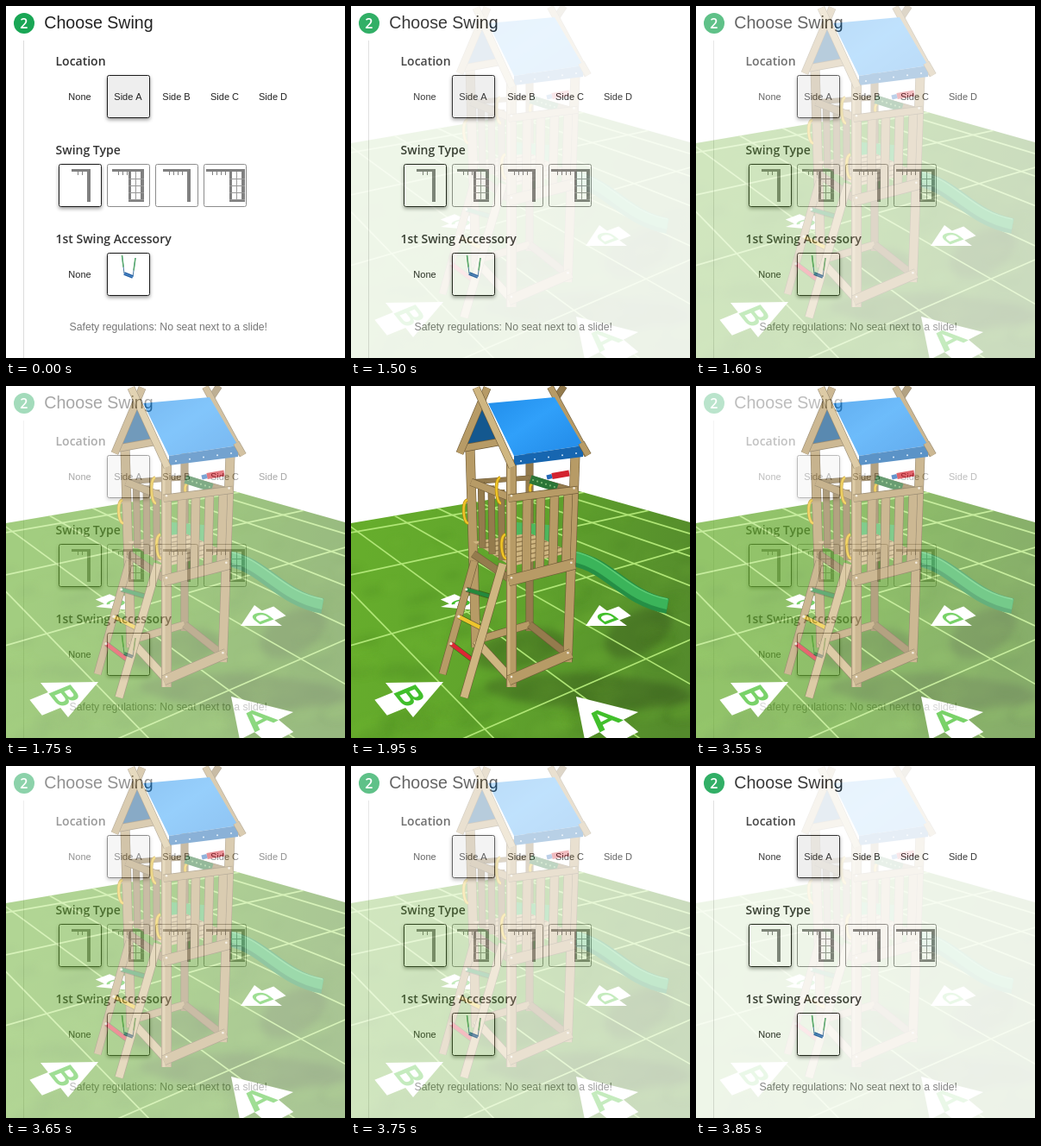
An HTML page with a canvas for the animation above (3.9 s loop, 393 by 408 pixels).

```html
<!DOCTYPE html>
<html lang="en">
<head>
<meta charset="utf-8">
<title>Choose Swing</title>
<style>
html, body { margin: 0; width: 100%; height: 100%; overflow: hidden; background: #fff; }
canvas { display: block; width: 393px; height: 408px; }
</style>
</head>
<body>
<canvas id="stage" width="393" height="408"></canvas>
<script>
const W = 393, H = 408, LOOP = 3900;
const SANS = '"Liberation Sans", Arial, sans-serif';
const OPEN = '"Open Sans", sans-serif';
let g;

function layer(draw) {
  const c = document.createElement('canvas');
  c.width = W;
  c.height = H;
  g = c.getContext('2d');
  draw();
  return c;
}

function text(s, x, y, font, color, align = 'left') {
  g.font = font;
  g.fillStyle = color;
  g.textAlign = align;
  g.fillText(s, x, y);
}

// Points are [x, y] pairs.
function path(points) {
  g.beginPath();
  for (const [x, y] of points) g.lineTo(x, y);
}

function poly(fill, ...points) {
  path(points);
  g.closePath();
  g.fillStyle = fill;
  g.fill();
}

function line(color, w, ...points) {
  path(points);
  g.strokeStyle = color;
  g.lineWidth = w;
  g.stroke();
}

function oval(color, x, y, rx, ry = rx, turn = 0) {
  g.beginPath();
  g.ellipse(x, y, rx, ry, turn, 0, 7);
  g.fillStyle = color;
  g.fill();
}

function blend(x1, y1, x2, y2, ...colors) {
  const f = g.createLinearGradient(x1, y1, x2, y2);
  colors.forEach((c, i) => f.addColorStop(i / (colors.length - 1), c));
  return f;
}

const mix = (a, b, t) => a.map((n, i) => n + (b[i] - n) * t);

// ---------- form ----------

function tile(x, y, fill, selected) {
  g.save();
  if (selected) {
    g.shadowColor = 'rgba(0,0,0,.4)';
    g.shadowBlur = 4;
    g.shadowOffsetY = 2;
  }
  g.beginPath();
  g.roundRect(x, y, 50, 50, 2.5);
  g.fillStyle = fill;
  g.fill();
  g.restore();
  g.beginPath();
  g.roundRect(x + .5, y + .5, 49, 49, 2);
  g.strokeStyle = selected ? '#1c1c1c' : '#8c8c8c';
  g.lineWidth = 1;
  g.stroke();
}

function swingIcon(x1, x2, tower) {
  const left = x2 - (tower ? 18 : 5);
  g.fillStyle = '#808080';
  g.fillRect(x1, 189, x2 - x1, 3);
  for (let x = x1 + 7; x < left - 1; x += 5) g.fillRect(x, 192, 1, 4);
  g.fillRect(x2 - 4, 189, 4, 38);
  if (!tower) return;
  g.fillRect(left, 189, 3, 38);
  g.fillRect(left, 224, 18, 3);
  g.fillStyle = '#999';
  g.fillRect(left + 8, 192, 1, 33);
  for (let y = 200; y < 225; y += 8) g.fillRect(left, y, 18, 1);
}

function swingPicture() {
  const seat = [[137, 310], [147, 314]];
  [[134.5, 289], [150, 292]].forEach((top, i) => {
    line('#4879a5', 1, top, seat[i]);
    line('#5fae72', 1.6, top, mix(top, seat[i], .65));
  });
  line('#2460a6', 4, ...seat);
  line('#5c97cf', 1, ...seat);
}

function drawForm() {
  g.fillStyle = '#fff';
  g.fillRect(0, 0, W, H);
  g.fillStyle = '#ddd';
  g.fillRect(20, 40, 1, H);
  oval('#19a655', 21, 20, 12);
  text('2', 20.7, 26, `600 16px ${OPEN}`, '#fff', 'center');
  text('Choose Swing', 44.3, 26, `19.6px ${SANS}`, '#222');

  const column = i => 61 + 56 * i;
  const option = (s, i, y) => text(s, column(i) + 24.5, y, `11px ${SANS}`, '#222', 'center');
  ['Location', 'Swing Type', '1st Swing Accessory'].forEach((s, i) =>
    text(s, 57.5, 69 + 103 * i, `600 14px ${OPEN}`, '#333'));

  tile(column(1), 80, '#eee', true);
  ['None', 'Side A', 'Side B', 'Side C', 'Side D'].forEach((s, i) => option(s, i, 109));

  for (let i = 0; i < 4; i++) tile(column(i), 183, '#fff', i === 0);
  swingIcon(76, 98, false);
  swingIcon(123, 160, true);
  swingIcon(182, 214, false);
  swingIcon(232, 277, true);

  option('None', 0, 315);
  tile(column(1), 286, '#fff', true);
  swingPicture();
  text('Safety regulations: No seat next to a slide!', 73.5, 376, `12.25px ${SANS}`, '#777');
}

// ---------- ground ----------

// An arrow on the grass: centre of its wings, vector to the tip, vector to the right wing.
function arrow(label, [x, y], [tx, ty], [rx, ry]) {
  const p = (t, r) => [x + t * tx + r * rx, y + t * ty + r * ry];
  poly('#fff', p(1, 0), p(0, 1), p(0, .45), p(-.42, .45), p(-.42, -.45), p(0, -.45), p(0, -1));
  g.save();
  g.transform(rx * .066, ry * .066, -tx * .036, -ty * .036, ...p(.25, 0));
  text(label, 0, 7.2, `bold 20px ${SANS}`, '#41bf2b', 'center');
  g.restore();
}

function drawGround() {
  g.save();
  path([[0, 159], [247, 117], [W, 158], [W, H], [0, H]]);
  g.clip();
  g.fillStyle = blend(0, 260, W, 340, '#66ad2c', '#5fa22c', '#548a2c');
  g.fillRect(0, 0, W, H);

  let seed = 7;
  const rnd = () => (seed = seed * 16807 % 2147483647) / 2147483647;
  g.filter = 'blur(4px)';
  for (let i = 0; i < 130; i++) {
    const y = 125 + rnd() * 285, r = 2 + (y - 110) / 35;
    oval(rnd() < .5 ? 'rgba(45,95,20,.12)' : 'rgba(135,200,60,.12)', rnd() * W, y, r * 2.2, r, -.2);
  }
  const shade = 'rgba(45,65,25,.3)';
  oval(shade, 333, 286, 42, 24, -.5);
  oval(shade, 275, 354, 120, 20, .05);
  oval(shade, 195, 305, 55, 22, -.2);
  g.filter = 'none';

  // two families of lines, each meeting in its own vanishing point on the horizon
  const horizon = -25;
  for (let k = 0; k < 5; k++) line('#b0e676', 1.7, [0, horizon + 1 / (.00513 - k * .00103)], [1126, horizon]);
  for (let k = 0; k < 8; k++) line('#b0e676', 1.7, [-257, horizon], [W, horizon + 1 / (.0051 - k * .0006)]);
  g.restore();

  arrow('A', [302, 394], [-41, -34], [31, -16]);
  arrow('B', [56, 364], [51, -21], [16, 20]);
  arrow('C', [122, 249], [24, 11], [-18, 7]);
  arrow('D', [304, 266], [-32, 12], [-16, -12]);
}

function drawSlide() {
  const chute = (color, w, dy) => {
    g.beginPath();
    g.moveTo(258, 200 + dy);
    g.bezierCurveTo(300, 208 + dy, 318, 246 + dy, 367, 255 + dy);
    g.strokeStyle = color;
    g.lineWidth = w;
    g.stroke();
  };
  chute('#258f45', 18, 0);
  chute('#3bb45a', 12, -2);
  chute('#5dcc74', 1.5, -8);
}

// ---------- tower ----------

const LIGHT = '#cfb681', MID = '#b79b66', DARK = '#947b4d', SHADE = '#6f5b38';

// Corner posts as seen on the stage: foot and top of each.
const POSTS = {
  front: [[186, 349], [186, 85]],
  right: [[251, 320], [260, 80]],
  left: [[145, 303], [138, 72]],
  back: [[207, 284], [207, 70]]
};

// Place inside the tower: u runs front to right, v front to left, h foot to top.
function at(u, v, h) {
  const p = name => mix(...POSTS[name], h);
  return mix(mix(p('front'), p('right'), u), mix(p('left'), p('back'), u), v);
}

function beam(a, b, w, color = MID) {
  line(SHADE, w, a, b);
  line(color, w - 1.2, a, b);
}

const post = (u, v, w, color) => beam(at(u, v, 0), at(u, v, 1), w, color);

function handle(x, y, h) {
  for (const [color, w] of [['#b58a13', 3.6], ['#f0c629', 2.2]]) {
    g.beginPath();
    g.moveTo(x + 3, y);
    g.bezierCurveTo(x - 4, y + 2, x - 2, y + h, x + 4, y + h);
    g.strokeStyle = color;
    g.lineWidth = w;
    g.stroke();
  }
}

function drawTower() {
  const base = .035, deck = .47, floor = .53, rail = .83;

  // far sides
  post(1, 1, 9, DARK);
  beam(at(0, 1, base), at(1, 1, base), 9);
  beam(at(1, 0, base), at(1, 1, base), 9, DARK);
  beam(at(0, 1, rail), at(1, 1, rail), 6, DARK);
  beam(at(1, 1, rail), at(1, 0, rail), 6, DARK);
  poly('#4db75c', at(.75, 1, .5), at(.75, 1, .6), at(1, .5, .62), at(1, .3, .5));
  post(0, 1, 11);
  post(1, 0, 11);

  // floor planks
  poly(LIGHT, at(0, 0, floor), at(1, 0, floor), at(1, 1, floor), at(0, 1, floor));
  for (let v = .1; v < 1; v += .16) line(DARK, 1.4, at(0, v, floor), at(1, v, floor));

  // left wall
  beam(at(0, 0, base), at(0, 1, base), 10, LIGHT);
  for (let v = .25; v < .8; v += .25) beam(at(0, v, floor), at(0, v, .85), 8, DARK);
  beam(at(0, 0, deck), at(0, 1, deck), 9, DARK);
  beam(at(0, 0, rail), at(0, 1, rail), 9);
  handle(132, 132, 27);
  handle(170, 106, 30);
  handle(209, 112, 16);

  // toys
  line('#2b7537', 10, [208, 108], [239, 118]);
  for (let t = .1; t < 1; t += .16) oval('#7db873', ...mix([208, 108], [239, 118], t), 1.1);
  line('#d3232f', 7, [233, 104.5], [253, 101]);
  line('#2468b8', 5, [227, 106], [233, 104.5]);

  // front wall
  for (let u = .25; u < .95; u += .22) beam(at(u, 0, .45), at(u, 0, rail), 10.5);
  post(0, 0, 12);
  const [x, y] = at(0, 0, 1);
  line(LIGHT, 3, [x - 3, y], [x - 3, POSTS.front[0][1]]);
  for (const [h, w] of [[base, 12], [deck, 13], [rail, 9]]) {
    beam(at(-.05, 0, h), at(1.06, 0, h), w);
    for (const u of [0, 1]) oval('#eee6d5', ...at(u, 0, h + .01), 1.3);
  }
}

function drawRoof() {
  beam([247, 0], [235, 18], 8, DARK);
  beam([231, 1], [274, 80], 8);
  poly('#14588f', [152, 16], [174, 61], [132, 68]);
  beam([131, 72], [176, 64], 9);
  beam([158, 2], [126, 78], 9);
  poly(blend(170, 15, 220, 88, '#2390ec', '#30a0fa', '#2690ec'), [159, 20], [236, 13], [269, 69], [189, 81]);
  poly('#1766b0', [189, 81], [269, 69], [269, 82], [189, 92]);
  for (let t = .1; t < 1; t += .2) oval('#cfe4f7', ...mix([189, 88], [269, 77], t), 1);
  beam([145, 2], [187, 94], 9, LIGHT);
  beam([267, 66], [275, 80], 8);
}

function drawLadder() {
  const near = [[176, 206], [131, 361]], far = [[143, 203], [106, 334]];
  beam(...far, 9);
  ['#23893c', '#edc52c', '#dd2634'].forEach((color, i) => {
    const t = .25 + .24 * i, a = mix(...far, t), b = mix(...near, t);
    line('rgba(0,0,0,.35)', 6, a, b);
    line(color, 4.4, a, b);
    oval('#eee6d5', ...a, 1.6);
  });
  beam(...near, 10, LIGHT);
  handle(176, 172, 28);
}

function drawScene() {
  g.fillStyle = '#fff';
  g.fillRect(0, 0, W, H);
  drawGround();
  drawSlide();
  drawTower();
  drawRoof();
  drawLadder();
}

// ---------- playback ----------

const form = layer(drawForm);
const scene = layer(drawScene);
const view = document.getElementById('stage').getContext('2d');
const start = performance.now();

// The crossfade moves in tenths, one every 50 ms.
function sceneAlpha(t) {
  const fade = from => Math.min(10, Math.floor((t - from) / 50) + 1) / 10;
  if (t < 1500) return 0;
  return t < 3450 ? fade(1500) : 1 - fade(3450);
}

function frame() {
  const t = (performance.now() - start) % LOOP;
  view.globalAlpha = 1;
  view.drawImage(form, 0, 0);
  view.globalAlpha = sceneAlpha(t);
  view.drawImage(scene, 0, 0);
  requestAnimationFrame(frame);
}
frame();
</script>
</body>
</html>
```
